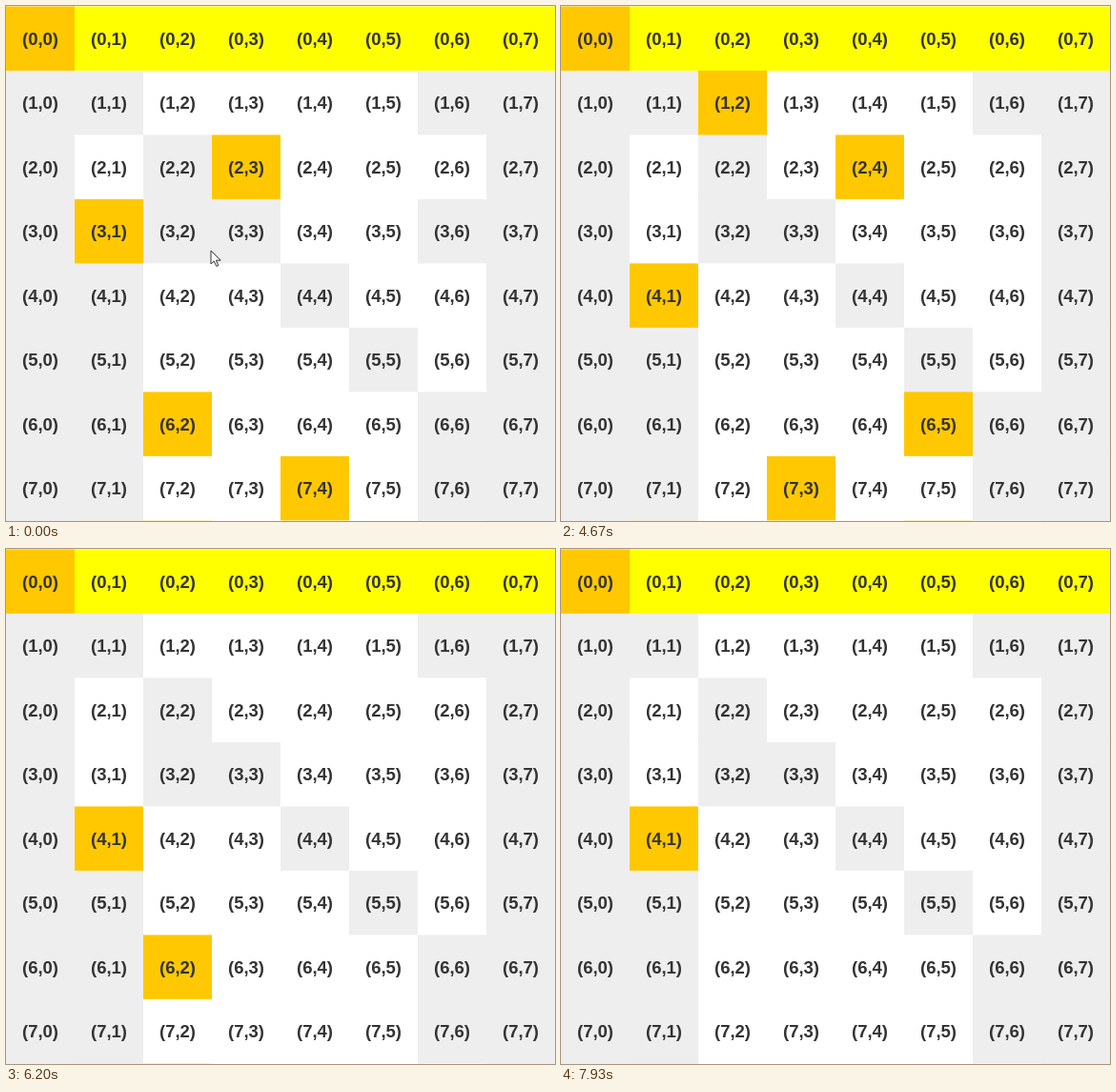
An HTML page that plays this animation: 576 px wide and 541 px high, repeating every 8 s.

```html
<!DOCTYPE html>
<html lang="en">
<head>
<meta charset="utf-8">
<title>Queens backtracking</title>
<style>
  html, body { margin: 0; width: 576px; height: 541px; overflow: hidden; background: #fff; }
  svg { display: block; }
  #board { filter: blur(0.4px); }
  text { font: bold 18.5px "Liberation Sans", Arial, sans-serif; text-anchor: middle; fill: #333; }
</style>
</head>
<body>
<svg width="576" height="541" viewBox="0 0 576 541">
  <g id="board"></g>
  <path id="cursor" transform="translate(214 256)" d="M1 1V15L4.2 12L6.8 17.4L8.8 16.5L6.4 11.2H11.2Z" fill="#fff" stroke="#333"/>
</svg>
<script>
const LOOP = 8000, CUT = 3930;
const CELL_W = 72, CELL_H = 67.5, TOP_Y = 0.4;
const QUEEN = '#ffc800', TOP = '#ffff00', UNTRIED = '#eeeeee', TRIED = '#ffffff';

// Columns per row that the search has not tried yet
const untried = ['', '0167', '027', '02367', '0147', '0157', '0167', '0167'];
const start = ['00', '31', '62', '23', '74'];

// [time, row+column of each queen added or removed]
const steps = [
  [200, '74 23'], [270, '43'],
  [CUT, '31 62 43 41 12 53'],
  [4270, '53'], [4330, '73'], [4400, '24'],
  [4670, '65'], [4730, '36'],
  [5000, '36'], [5070, '65'], [5130, '24'], [5200, '54'], [5330, '25'],
  [5530, '25'], [5600, '35'],
  [5870, '35 54'], [6000, '73 12'],
  [6200, '62'], [6270, '13'], [6400, '34'],
  [6600, '75'], [6870, '75 34'], [6930, '54'], [7000, '25'],
  [7270, '25'], [7470, '75'], [7670, '75 54'], [7730, '13'],
  [7930, '62']
];

const board = document.getElementById('board');
const cursor = document.getElementById('cursor');

function add(tag, attrs) {
  const el = document.createElementNS('http://www.w3.org/2000/svg', tag);
  for (const name in attrs) el.setAttribute(name, attrs[name]);
  board.append(el);
  return el;
}

// Each rect runs on under its later neighbours, so no seams show between cells
const cells = [];
for (let r = 0; r < 8; r++) {
  for (let c = 0; c < 8; c++) {
    const x = c * CELL_W, y = TOP_Y + r * CELL_H;
    const rect = add('rect', { x, y, width: CELL_W * (c === 7 ? 2 : 1), height: CELL_H * (8 - r) });
    add('text', { x: x + CELL_W / 2, y: y + 40.4 }).textContent = `(${r},${c})`;
    cells.push({ rect, r, c, key: `${r}${c}` });
  }
}

function queensAt(t) {
  const queens = new Set(start);
  for (const [time, keys] of steps) {
    if (time > t) break;
    for (const key of keys.split(' ')) {
      if (!queens.delete(key)) queens.add(key);
    }
  }
  return queens;
}

function baseColor({ r, c, key }, t) {
  if (r === 0) return TOP;
  if (key === '36' && t >= CUT) return TRIED;
  return untried[r].includes(c) ? UNTRIED : TRIED;
}

function draw(t) {
  const queens = queensAt(t);
  for (const cell of cells) {
    cell.rect.setAttribute('fill', queens.has(cell.key) ? QUEEN : baseColor(cell, t));
  }
  cursor.style.visibility = t < CUT ? 'visible' : 'hidden';
}

const origin = performance.now();
function tick() {
  draw((performance.now() - origin) % LOOP);
  requestAnimationFrame(tick);
}
tick();
</script>
</body>
</html>
```
